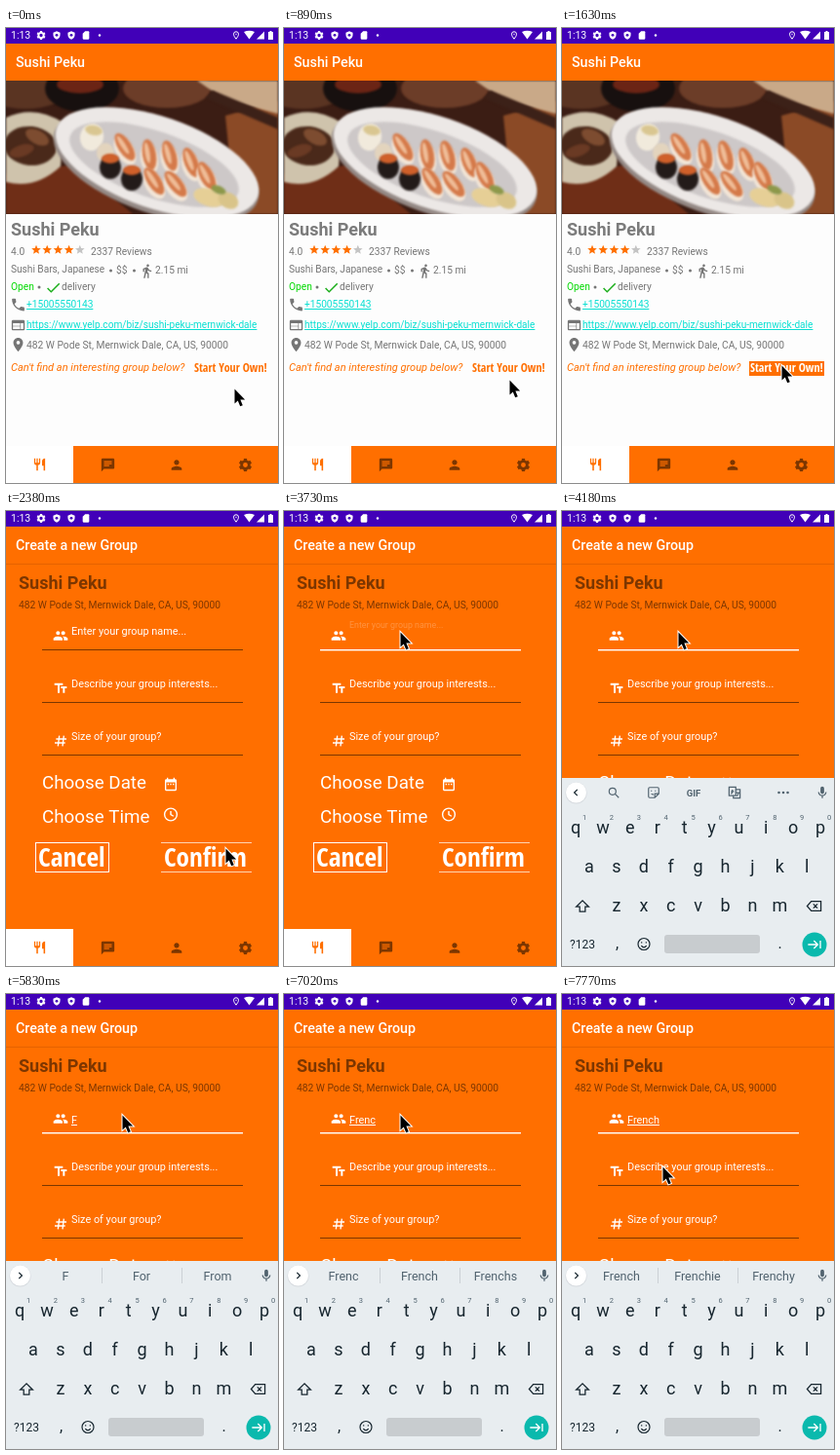
Write an HTML page with a canvas that moves like this. It is 279 px wide and 467 px high and loops after 8000 ms.

```html
<!DOCTYPE html>
<html lang="en">
<head>
<meta charset="utf-8">
<title>Create a new group</title>
<style>
html, body { margin: 0; height: 100%; overflow: hidden; background: #fff; }
canvas { display: block; width: 100vw; height: 100vh; }
</style>
</head>
<body>
<canvas id="stage" width="279" height="467"></canvas>
<script>
const ctx = document.getElementById('stage').getContext('2d');
const LOOP = 8000, PURPLE = '#4100b8', ORANGE = '#ff6f00', BROWN = '#7c3600', GREY = '#757575', LINK = '#08dfd2';
const SLATE = '#51636f', INK = '#17262f', KEYBOARD = '#e8edf0';
const SANS = 'Roboto, sans-serif';
const NARROW = '"Open Sans Condensed", "Open Sans", "Noto Sans", sans-serif';
const PLACE = 'Sushi Peku', ADDRESS = '482 W Pode St, Mernwick Dale, CA, US, 90000';

// Icon outlines on a 24-unit grid
const ICONS = {
  food: 'M11 9H9V2H7v7H5V2H3v7c0 2.12 1.66 3.84 3.75 3.97V22h2.5v-9.03C11.34 12.84 13 11.12 13 9V2h-2zm5-3v8h2.5v8H21V2c-2.76 0-5 2.24-5 4z',
  chat: 'M20 2H4c-1.1 0-2 .9-2 2v18l4-4h14c1.1 0 2-.9 2-2V4c0-1.1-.9-2-2-2zM6 9h12v2H6zm8 5H6v-2h8zm4-6H6V6h12z',
  person: 'M12 12c2.21 0 4-1.79 4-4s-1.79-4-4-4-4 1.79-4 4 1.79 4 4 4zm0 2c-2.67 0-8 1.34-8 4v2h16v-2c0-2.66-5.33-4-8-4z',
  group: 'M16 11c1.66 0 3-1.34 3-3s-1.34-3-3-3-3 1.34-3 3 1.34 3 3 3zm-8 0c1.66 0 3-1.34 3-3S9.66 5 8 5 5 6.34 5 8s1.34 3 3 3zm0 2c-2.33 0-7 1.17-7 3.5V19h14v-2.5c0-2.33-4.67-3.5-7-3.5zm8 0l-1 .05c1.2.84 2 1.97 2 3.45V19h6v-2.5c0-2.33-4.67-3.5-7-3.5z',
  phone: 'M6.62 10.79c1.44 2.83 3.76 5.14 6.59 6.59l2.2-2.2c.27-.27.67-.36 1.02-.24 1.12.37 2.33.57 3.57.57.55 0 1 .45 1 1V20c0 .55-.45 1-1 1C10.61 21 3 13.39 3 4c0-.55.45-1 1-1h3.5c.55 0 1 .45 1 1 0 1.25.2 2.45.57 3.57.11.35.03.74-.25 1.02z',
  web: 'M20 4H4c-1.1 0-2 .9-2 2v12c0 1.1.9 2 2 2h16c1.1 0 2-.9 2-2V6c0-1.1-.9-2-2-2zm-5 14H4v-4h11zm0-5H4V9h11zm5 5h-4V9h4z',
  pin: 'M12 2C8.13 2 5 5.13 5 9c0 5.25 7 13 7 13s7-7.75 7-13c0-3.87-3.13-7-7-7zm0 9.5c-1.38 0-2.5-1.12-2.5-2.5s1.12-2.5 2.5-2.5 2.5 1.12 2.5 2.5-1.12 2.5-2.5 2.5z',
  walk: 'M13.5 5.5c1.1 0 2-.9 2-2s-.9-2-2-2-2 .9-2 2 .9 2 2 2zM9.8 8.9L7 23h2.1l1.8-8 2.1 2v6h2v-7.5l-2.1-2 .6-3C14.8 12 16.8 13 19 13v-2c-1.9 0-3.5-1-4.3-2.4l-1-1.6c-.4-.6-1-1-1.7-1-.3 0-.5.1-.8.1L6 8.3V13h2V9.6z',
  check: 'M9 16.2L4.8 12l-1.4 1.4L9 19 21 7l-1.4-1.4z',
  star: 'M12 17.27L18.18 21l-1.64-7.03L22 9.24l-7.19-.61L12 2 9.19 8.63 2 9.24l5.46 4.73L5.82 21z',
  letters: 'M2.5 4v3h5v12h3V7h5V4zm19 5h-9v3h3v7h3v-7h3z',
  calendar: 'M9 11H7v2h2zm4 0h-2v2h2zm4 0h-2v2h2zm2-7h-1V2h-2v2H8V2H6v2H5c-1.1 0-2 .9-2 2v14c0 1.1.9 2 2 2h14c1.1 0 2-.9 2-2V6c0-1.1-.9-2-2-2zm0 16H5V9h14z',
  shield: 'M12 1L3 5v6c0 5.55 3.84 10.74 9 12 5.16-1.26 9-6.45 9-12V5z',
  card: 'M18 2h-8L4 8v12c0 1.1.9 2 2 2h12c1.1 0 2-.9 2-2V4c0-1.1-.9-2-2-2z',
  mic: 'M12 14c1.66 0 3-1.34 3-3V5c0-1.66-1.34-3-3-3S9 3.34 9 5v6c0 1.66 1.34 3 3 3zm5-3c0 6.6-10 6.6-10 0H5c0 3.5 2.6 6.2 6 6.7V21h2v-3.3c3.4-.5 6-3.2 6-6.7z'
};
const LINES = {
  marker: 'M12 21C8 16 6 12 6 9a6 6 0 0 1 12 0c0 3-2 7-6 12zM12 8v3',
  hash: 'M10 4L8 20M17 4l-2 16M5 9h16M3 15h16',
  clock: 'M21 12a9 9 0 1 1-18 0 9 9 0 0 1 18 0M12 7v5l4 2.5',
  search: 'M16 10a6 6 0 1 1-12 0 6 6 0 0 1 12 0M14.5 14.5L21 21',
  sticker: 'M14 21H5a2 2 0 0 1-2-2V5a2 2 0 0 1 2-2h14a2 2 0 0 1 2 2v9zv-7h7M8 8v2M15 8v2M8 14q2 2 4 1',
  translate: 'M3 3h11v14H3zM14 7h7v14H10v-4M6 10h5M8.5 7v3q0 3-2.5 4M14 12h5l-3 6',
  smile: 'M21 12a9 9 0 1 1-18 0 9 9 0 0 1 18 0M8 14.5q4 5 8 0M8.5 8.5v2M15.5 8.5v2',
  shift: 'M12 4L3 13h5v7h8v-7h5z',
  erase: 'M8 5h14v14H8l-6-7zM11 9l6 6M17 9l-6 6',
  next: 'M2 12h15M11 6l6 6-6 6M21 6v12',
  left: 'M14 7l-5 5 5 5',
  right: 'M10 7l5 5-5 5'
};

// Each entry: [start time, ...values]; the value holds until the next start
const POINTER = [[0, 234, 370], [450, 232, 370], [600, 232, 366], [750, 232, 365], [890, 231, 361],
  [1040, 223, 345], [1340, 225, 346], [2980, 127, 166], [3130, 112, 117], [3280, 115, 119],
  [3430, 119, 124], [7470, 117, 150], [7620, 102, 176], [7770, 103, 177]];
const TYPING = [[0], [5830, 'F', 'For', 'From'], [5980, 'Fr', 'For', 'Fri'], [6420, 'Fre', 'Free', 'Fri'],
  [6570, 'Fren', 'French', 'Free'], [7020, 'Frenc', 'French', 'Frenchs'],
  [7170, 'French', 'Frenchie', 'Frenchy']];
const valueAt = (steps, t) => steps.filter(s => s[0] <= t).pop().slice(1);

function box(x, y, w, h, color) {
  ctx.fillStyle = color;
  ctx.fillRect(x, y, w, h);
}
function oval(x, y, rx, ry, color, turn = 0) {
  ctx.fillStyle = color;
  ctx.beginPath();
  ctx.ellipse(x, y, rx, ry, turn, 0, 7);
  ctx.fill();
}
const dot = (x, y, r, color) => oval(x, y, r, r, color);
function shape(d, color) {
  ctx.fillStyle = color;
  ctx.fill(new Path2D(d));
}
function text(s, x, y, size, color, style = '', align = 'left', family = SANS) {
  ctx.font = `${style} ${size}px ${family}`;
  ctx.textAlign = align;
  ctx.fillStyle = color;
  ctx.fillText(s, x, y);
}
const narrow = (s, x, y, size, color) => text(s, x, y, size, color, 'bold condensed', 'left', NARROW);
function underlined(s, x, y, size, color) {
  text(s, x, y, size, color);
  box(x, Math.round(y) + 1, ctx.measureText(s).width, 1, color);
}
function icon(name, x, y, size, color, weight = 2) {
  ctx.save();
  ctx.translate(x - size / 2, y - size / 2);
  ctx.scale(size / 24, size / 24);
  ctx.lineWidth = weight;
  ctx.strokeStyle = color;
  if (ICONS[name]) shape(ICONS[name], color);
  else ctx.stroke(new Path2D(LINES[name]));
  ctx.restore();
}
function gear(x, y, r, color) {
  ctx.strokeStyle = color;
  ctx.lineWidth = r * .42;
  ctx.beginPath();
  ctx.arc(x, y, r * .58, 0, 7);
  ctx.stroke();
  ctx.lineWidth = r * .5;
  for (let i = 0; i < 6; i++) {
    const a = (i + .5) * Math.PI / 3;
    ctx.beginPath();
    ctx.moveTo(x + r * .6 * Math.cos(a), y + r * .6 * Math.sin(a));
    ctx.lineTo(x + r * Math.cos(a), y + r * Math.sin(a));
    ctx.stroke();
  }
}

function header(title) {
  box(0, 0, 279, 16, PURPLE);
  text('1:13', 5, 11, 10.5, '#fff');
  gear(36, 7.5, 4.5, '#fff');
  for (const x of [52, 67]) {
    icon('shield', x, 7.5, 9.5, '#fff');
    dot(x, 7.3, 1.4, PURPLE);
  }
  icon('card', 82, 7.5, 10, '#fff');
  dot(96, 7.5, 1.2, '#fff');
  icon('marker', 236, 7.5, 10, '#fff', 2.4);
  shape('M244 4q5.5-2.5 11 0l-5.5 7.5z', '#fff');
  shape('M257 11.5h8v-8z', '#fff');
  shape('M269 4h1.5v-1h2v1h1.5v8h-5z', '#fff');
  box(0, 16, 279, 38, ORANGE);
  text(title, 10, 40, 14.25, '#fff', '500');
}
function tabs() {
  box(0, 429, 279, 38, ORANGE);
  box(0, 429, 69, 38, '#fff');
  icon('food', 34.5, 448, 15, ORANGE);
  icon('chat', 104.5, 448.5, 16, BROWN);
  icon('person', 175, 448.5, 16, BROWN);
  gear(245.5, 448.5, 6.6, BROWN);
}

function photo() {
  ctx.save();
  ctx.beginPath();
  ctx.rect(0, 54, 279, 137);
  ctx.clip();
  box(0, 54, 279, 137, '#3b1d14');
  ctx.filter = 'blur(1px)';
  shape('M0 150L70 140 130 191H0z', '#6f2e17');
  shape('M225 90L279 75V191H235z', '#8b4a26');
  oval(20, 66, 40, 17, '#5a3422');
  oval(78, 62, 38, 24, '#17100f');
  oval(76, 58, 24, 9, '#6b2415');
  oval(165, 62, 45, 20, '#6c3d28');
  shape('M196 54H279V88L225 74z', '#c9a988');
  shape('M212 64L279 92V104L205 72z', '#3c2118');
  shape('M0 92Q30 78 60 98L56 142Q30 166 0 158z', '#cfc3ac');
  oval(25, 121, 27, 20, '#4a291a', .1);
  oval(32, 112, 13, 7, '#7d4c30', .5);
  oval(16, 126, 13, 6, '#6a3a24', -.3);
  oval(154, 142, 110, 48, '#958a86', .33);
  oval(155, 138, 109, 47, '#ece8e6', .33);
  oval(152, 140, 91, 34, '#cdc8c8', .33);
  oval(88, 112, 12, 14, '#f1eadc', .2);
  oval(90, 105, 9, 5, '#d9c691', .2);
  oval(102, 128, 9, 10, '#e3d4bd');
  for (const [x, y, turn] of [[122, 122, 1], [147, 130, 1.4], [168, 131, 1.3], [190, 138, 1.2],
    [152, 157, 1], [174, 160, .9], [206, 152, 1.1]]) {
    oval(x, y + 4, 16, 9, '#f3e6d7', turn);
    oval(x, y, 16, 7, '#d57a4a', turn);
    oval(x - 2, y - 2, 11, 2.5, '#efbd98', turn);
  }
  for (const [x, y] of [[129, 152], [107, 140]]) {
    oval(x, y + 3, 11, 12, '#231b19');
    oval(x, y - 6, 9, 5, '#d0602a');
  }
  oval(208, 174, 16, 9, '#e6cf96', .3);
  oval(228, 177, 11, 8, '#d9c489', .5);
  oval(218, 166, 8, 4, '#8d984a', .4);
  ctx.restore();
}

function placeScreen(pressed) {
  box(0, 54, 279, 413, '#fdfdfd');
  header(PLACE);
  photo();
  text(PLACE, 5, 213, 18, '#7b7b7b', 'bold');
  text('4.0', 5, 233, 10.2, GREY);
  for (let i = 0; i < 5; i++) icon('star', 31 + i * 11.2, 227.5, 11.5, i < 4 ? ORANGE : '#c4c4c4');
  text('2337 Reviews', 87, 233, 10.2, GREY);
  text('Sushi Bars, Japanese', 5, 251, 10.15, GREY);
  dot(107.5, 249, 1.5, GREY);
  text('$$', 113, 252, 10.2, GREY);
  dot(131.5, 249, 1.5, GREY);
  icon('walk', 144.5, 249.5, 16, GREY);
  text('2.15 mi', 153, 252, 10.2, GREY);
  text('Open', 5, 269, 10.2, '#00d900');
  dot(34, 266, 1.5, GREY);
  icon('check', 48.5, 266.5, 18, '#1cae1c');
  text('delivery', 57, 269, 10.2, GREY);
  icon('phone', 12.5, 284, 17, GREY);
  underlined('+15005550143', 21, 287, 10.15, LINK);
  icon('web', 12.5, 305, 16, GREY);
  underlined('https://www.yelp.com/biz/sushi-peku-mernwick-dale', 21, 307.5, 10.1, LINK);
  icon('pin', 12.5, 325, 17, GREY);
  text(ADDRESS, 21, 328.5, 10.25, GREY);
  text("Can't find an interesting group below?", 5, 352, 11.05, ORANGE, 'italic');
  if (pressed) box(192, 342, 77, 15, ORANGE);
  narrow('Start Your Own!', 193, 353, 12, pressed ? '#fff' : ORANGE);
  tabs();
}

function formScreen(t) {
  const focused = t >= 3730, name = valueAt(TYPING, t)[0];
  box(0, 15, 279, 452, ORANGE);
  header('Create a new Group');
  box(0, 54, 279, 1, '#e46300');
  text(PLACE, 13, 80, 18, BROWN, 'bold');
  text(ADDRESS, 13, 100, 10.25, BROWN);
  ['group', 'letters', 'hash'].forEach((mark, i) => {
    icon(mark, 56, 128 + i * 54, 16, '#fff');
    if (focused && !i) box(37, 142, 206, 1.4, '#fff');
    else box(37, 142 + i * 54, 206, 1, BROWN);
  });
  const hint = 'Enter your group name...';
  if (!focused) text(hint, 67, 127, 10.9, '#fff');
  else if (t < 3880) text(hint, 67, 120, 8.9, 'rgba(255,255,255,.25)');
  if (name) underlined(name, 67, 132.5, 10.9, '#fff');
  text('Describe your group interests...', 67, 181, 10.9, '#fff');
  text('Size of your group?', 67, 235, 10.9, '#fff');
  text('Choose Date', 37, 285, 18.8, '#fff');
  text('Choose Time', 37, 320, 18.8, '#fff');
  icon('calendar', 169, 280.5, 16, '#fff');
  icon('clock', 169, 311.5, 17, '#fff');
  ctx.strokeStyle = '#fff';
  ctx.lineWidth = 1;
  ctx.strokeRect(30.5, 340.5, 75, 30);
  box(159, 340, 93, 1, 'rgba(255,255,255,.7)');
  box(159, 370, 93, 1, 'rgba(255,255,255,.7)');
  narrow('Cancel', 33, 365, 27.4, '#fff');
  narrow('Confirm', 162, 365, 27.2, '#fff');
  tabs();
  if (t >= 3880) {
    ctx.save();
    ctx.translate(0, t < 4180 ? 40 : 0);
    keyboard(valueAt(TYPING, t));
    ctx.restore();
  }
}

function keyboard(words) {
  box(0, 274, 279, 193, KEYBOARD);
  dot(14.5, 289.5, 11, '#d5dade');
  dot(14.5, 289, 10.5, '#fff');
  icon(words.length ? 'right' : 'left', 14.5, 289, 15, INK);
  if (words.length) {
    words.forEach((word, i) => text(word, 61 + i * 78, 294, 12.5, SLATE, '', 'center'));
    box(98, 281, 1, 16, '#cbd1d5');
    box(180, 281, 1, 16, '#cbd1d5');
  } else {
    icon('search', 53, 289, 14, SLATE);
    icon('sticker', 94, 289, 14, SLATE);
    text('GIF', 135, 292.5, 9.5, SLATE, 'bold', 'center');
    icon('translate', 177, 289, 15, SLATE);
    for (const x of [222.5, 227, 231.5]) dot(x, 289, 1.3, SLATE);
  }
  icon('mic', 267, 289, 15, SLATE);
  ['qwertyuiop', 'asdfghjkl', 'zxcvbnm'].forEach((row, r) =>
    [...row].forEach((key, i) => {
      const x = 14 + r * 14 * (r > 1 ? 1.5 : 1) + i * 27.9;
      text(key, x, 330.5 + r * 40, 18, INK, '', 'center');
      if (!r) text((i + 1) % 10, x + 9, 317, 7.5, SLATE, '', 'center');
    }));
  icon('shift', 21, 405.5, 17, INK, 1.8);
  icon('erase', 258.5, 405.5, 17, INK, 1.8);
  text('?123', 21, 449, 12, INK, '', 'center');
  text(',', 56.5, 449, 16, INK, '', 'center');
  icon('smile', 84, 444.5, 16, INK, 1.8);
  ctx.fillStyle = '#c8cccf';
  ctx.beginPath();
  ctx.roundRect(105, 435, 98, 19, 3);
  ctx.fill();
  text('.', 223.5, 449, 16, INK, '', 'center');
  dot(259, 445, 12.5, '#0ab9ad');
  icon('next', 259, 445, 16, '#fff');
}

function pointer(t) {
  ctx.save();
  ctx.translate(...valueAt(POINTER, t));
  const arrow = new Path2D('M.5.5V15.5l3.3-3 2.4 5.8 2.6-1.1-2.4-5.6h4.8z');
  ctx.strokeStyle = '#fff';
  ctx.lineWidth = 2;
  ctx.stroke(arrow);
  ctx.fillStyle = '#000';
  ctx.fill(arrow);
  ctx.restore();
}

function frame() {
  const t = performance.now() % LOOP;
  if (t < 2380) placeScreen(t >= 1630);
  else formScreen(t);
  pointer(t);
  requestAnimationFrame(frame);
}
frame();
</script>
</body>
</html>
```
